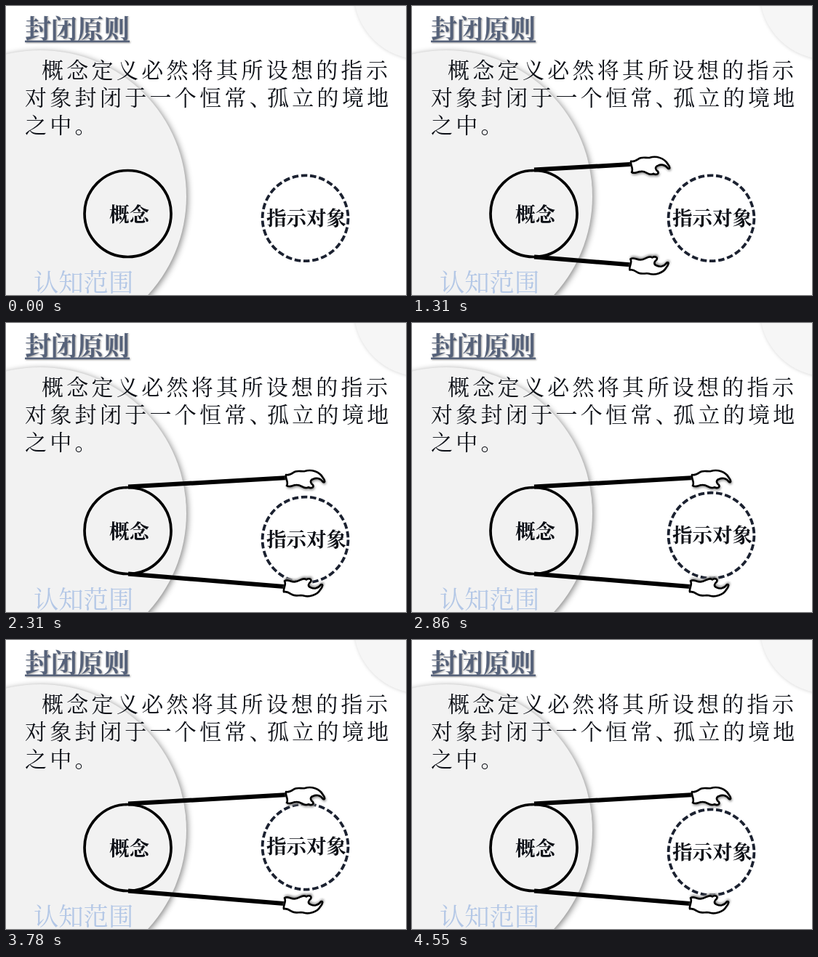
An HTML page for the animation above (6170 ms loop, 550 px wide and 398 px high).

```html
<!DOCTYPE html>
<html lang="zh-CN">
<head>
<meta charset="utf-8">
<style>
  html, body { margin: 0; width: 100%; height: 100%; overflow: hidden; background: #fff; }
  svg { display: block; width: 550px; height: 398px; }
  text { font-family: "Noto Serif CJK SC", "Noto Sans CJK SC", "Noto Sans CJK", serif; fill: #0c0f16; }
  .body { font-size: 30px; font-weight: 500; letter-spacing: 4.3px; }
  .label { font-size: 27.5px; font-weight: 600; }
  .title { fill: #56627a; filter: drop-shadow(1.5px 1.5px 1px #999); }
  .title text { font-size: 36px; font-weight: 700; fill: inherit; }
  .scope { font-size: 34.3px; fill: #b3c7e6; }
  .disc { fill: #f2f2f2; filter: drop-shadow(2px 2px 4px #888); }
  .corner { fill: #f6f6f6; filter: drop-shadow(0 1px 2px #ddd); }
  .arm line { stroke: #000; stroke-width: 6; }
  .arm use { fill: #fff; stroke: #000; stroke-width: 2.6; stroke-linejoin: round; filter: drop-shadow(1px 2px 1.5px #999); }
</style>
</head>
<body>
<svg viewBox="0 0 550 398">
  <defs>
    <path id="hand" d="M-1-4C3-3 6-5 9-7C14-11 20-8 25-9C34-12 45-8 49-1C53 4 53 7 50 6C46 0 40 0 36 2C31 4 33 8 36 10C38 14 33 15 30 13C24 17 20 9 13 10C8 10 4 14 0 11C3 6-2 2-1-4Z"/>
  </defs>

  <circle class="disc" cx="47" cy="262" r="201"/>
  <circle class="corner" cx="572" cy="-20" r="94"/>

  <g class="title">
    <text x="26" y="45">封闭原则</text>
    <rect x="26" y="47.5" width="144" height="2.5"/>
  </g>
  <text class="body" x="49" y="99">概念定义必然将其所设想的指示</text>
  <text class="body" x="26" y="137">对象封闭于一个恒常、<tspan x="359">孤立的境地</tspan></text>
  <text class="body" x="26" y="175">之中。</text>
  <text class="scope" x="38" y="393">认知范围</text>

  <circle cx="167.5" cy="286" r="59.5" fill="none" stroke="#000" stroke-width="3.7"/>
  <text class="label" x="142" y="297">概念</text>

  <g id="object">
    <circle cx="411.5" cy="292.3" r="58.9" fill="none" stroke="#1b2130" stroke-width="3.8" stroke-dasharray="8.6 3.736"/>
    <text class="label" x="358" y="301.5">指示对象</text>
  </g>

  <g id="arms">
    <g class="arm"><line x1="168" y1="225.5"/><g><use href="#hand"/></g></g>
    <g class="arm"><line x1="168" y1="345.5"/><g><use href="#hand"/></g></g>
  </g>
</svg>
<script>
  const LOOP = 6170, START = 550, STEPS = 52, STEP = 4000 / STEPS;
  const $ = id => document.getElementById(id);
  const shapes = [
    { y: 225.5, slope: -0.057, reach: 386, drop: 0, flip: 1 },
    { y: 345.5, slope: 0.083, reach: 383, drop: 3, flip: -1 }
  ];
  const arms = [...document.querySelectorAll(".arm")].map((el, i) => ({
    line: el.querySelector("line"),
    hand: el.querySelector("g"),
    ...shapes[i]
  }));
  const ramp = (t, from, to) => Math.max(0, Math.min(1, (t - from) / (to - from)));

  // The dashed circle is pushed down, rests, is pushed up: mirrored about MIDDLE.
  const MIDDLE = 3020;
  const sway = [[0, 0], [460, 1], [740, 7], [975, 14], [1150, 10.5], [1450, 2], [1530, 0]];
  function offsetY(t) {
    const d = Math.abs(t - MIDDLE);
    const i = sway.findIndex(([at]) => at > d);
    if (i < 0) return 0;
    const [a, va] = sway[i - 1], [b, vb] = sway[i];
    return Math.sign(MIDDLE - t) * (va + (vb - va) * ramp(d, a, b));
  }

  function draw(now) {
    const ms = now % LOOP;
    const shown = ms >= START;
    const t = START + STEP * Math.min(STEPS, Math.floor((ms - START + 14) / STEP));

    $("arms").setAttribute("opacity", shown ? ramp(t, START - STEP, 1010) : 0);
    const travel = ramp(t, 1010, 1555);
    for (const { line, hand, y, slope, reach, drop, flip } of arms) {
      const x = 192 + (reach - 192) * travel;
      const endY = y + slope * (x - 168);
      line.setAttribute("x2", x + 2);
      line.setAttribute("y2", endY);
      hand.setAttribute("transform", `translate(${x} ${endY + drop}) scale(1 ${flip})`);
    }
    $("object").setAttribute("transform", `translate(0 ${shown ? offsetY(t) : 0})`);
  }

  const begin = performance.now();
  (function tick() {
    draw(performance.now() - begin);
    requestAnimationFrame(tick);
  })();
</script>
</body>
</html>
```
